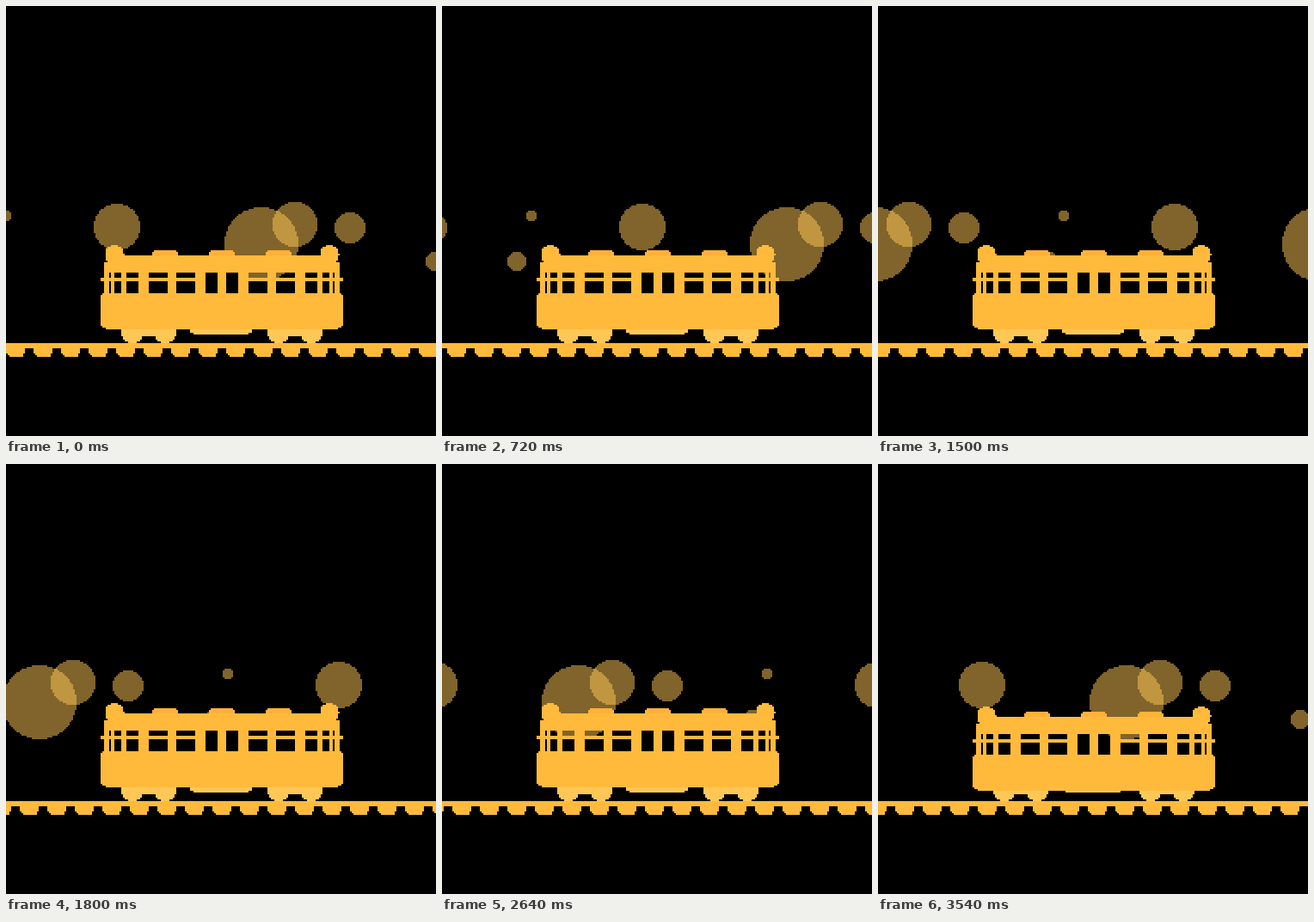
Recreate the animation shown at these times as an HTML page with a canvas. Size 500 by 500 pixels, loop 3.6 s.

```html
<!DOCTYPE html>
<html lang="en">
<head>
<meta charset="utf-8">
<title>Tram</title>
<style>
  html, body { margin: 0; width: 100%; height: 100%; overflow: hidden; background: #000; }
  canvas { display: block; width: 500px; height: 500px; image-rendering: pixelated; }
</style>
</head>
<body>
<canvas id="stage" width="250" height="250"></canvas>
<script>
const ctx = document.getElementById('stage').getContext('2d');
const LOOP = 3600, STEP = 60, STEPS = LOOP / STEP;
const BODY = '#ffba3c', ROOF_BOX = '#ffb13a', PALE = '#ffc756';
const SKY_WIDTH = 258, TIE_GAP = 16, TIES_PER_LOOP = 21, AXIS = 251;

// x, y, radius
const bubbles = [
  [148.5, 138.5, 21.5], [168, 127, 13], [200, 129, 9],
  [64.5, 128.5, 13.5], [0, 122, 3], [249.5, 148.5, 5.5]
];
// left edge, width
const posts = [[57, 3], [61, 2], [67, 3], [77, 6], [94, 5], [110, 6]];

function rect(x, y, w, h) {
  ctx.fillRect(x, y, w, h);
}

function mirrored(x, y, w, h) {
  rect(x, y, w, h);
  rect(AXIS - x - w, y, w, h);
}

// Filled row by row to keep the edges crisp.
function disc(cx, cy, r) {
  for (let y = Math.round(cy - r); y < cy + r; y++) {
    const half = Math.sqrt(Math.max(0, r * r - (y + 0.5 - cy) ** 2));
    const left = Math.round(cx - half);
    rect(left, y, Math.round(cx + half) - left, 1);
  }
}

function drawBubbles(step) {
  const shift = Math.round(step * SKY_WIDTH / STEPS);
  ctx.fillStyle = PALE;
  ctx.globalAlpha = 0.5;
  for (const [x, y, r] of bubbles) {
    const cx = (x + shift) % SKY_WIDTH;
    for (const wrap of [-SKY_WIDTH, 0, SKY_WIDTH]) disc(cx + wrap, y, r);
  }
  ctx.globalAlpha = 1;
}

function drawUndercarriage() {
  ctx.fillStyle = PALE;
  for (const x of [73.5, 92.5]) {
    disc(x, 189.5, 6.5);
    disc(AXIS - x, 189.5, 6.5);
  }
  mirrored(73, 188, 20, 4);
  rect(107, 188, 36, 2);
  rect(109, 190, 32, 1);
}

function drawCar() {
  ctx.fillStyle = ROOF_BOX;
  for (const x of [85, 118, 151]) {
    rect(x + 1, 142, 13, 1);
    rect(x, 143, 15, 2);
  }
  ctx.fillStyle = BODY;
  disc(63, 144.5, 5.5);
  disc(AXIS - 63, 144.5, 5.5);
  rect(59, 145, 133, 4);
  rect(57, 149, 137, 6);
  for (const [x, w] of posts) mirrored(x, 155, w, 12);
  rect(123, 155, 5, 12);
  mirrored(55, 158, 55, 2);
  rect(56, 167, 139, 1);
  rect(55, 168, 141, 18);
  rect(56, 186, 139, 1);
  rect(58, 187, 135, 1);
}

function drawTrack(step) {
  const shift = Math.round(step * TIES_PER_LOOP * TIE_GAP / STEPS) % TIE_GAP;
  ctx.fillStyle = BODY;
  rect(0, 196, 250, 3);
  for (let x = shift - TIE_GAP; x < 250; x += TIE_GAP) {
    rect(x, 199, 11, 3);
    rect(x + 1, 202, 9, 1);
    rect(x + 2, 203, 8, 1);
  }
}

function draw(time) {
  const step = Math.floor(time % LOOP / STEP);
  ctx.clearRect(0, 0, 250, 250);
  drawBubbles(step);
  drawUndercarriage();
  ctx.save();
  ctx.translate(0, step % 10 > 7 ? 2 : 0);
  drawCar();
  ctx.restore();
  drawTrack(step);
}

const start = performance.now();
function tick() {
  draw(performance.now() - start);
  requestAnimationFrame(tick);
}
tick();
</script>
</body>
</html>
```
